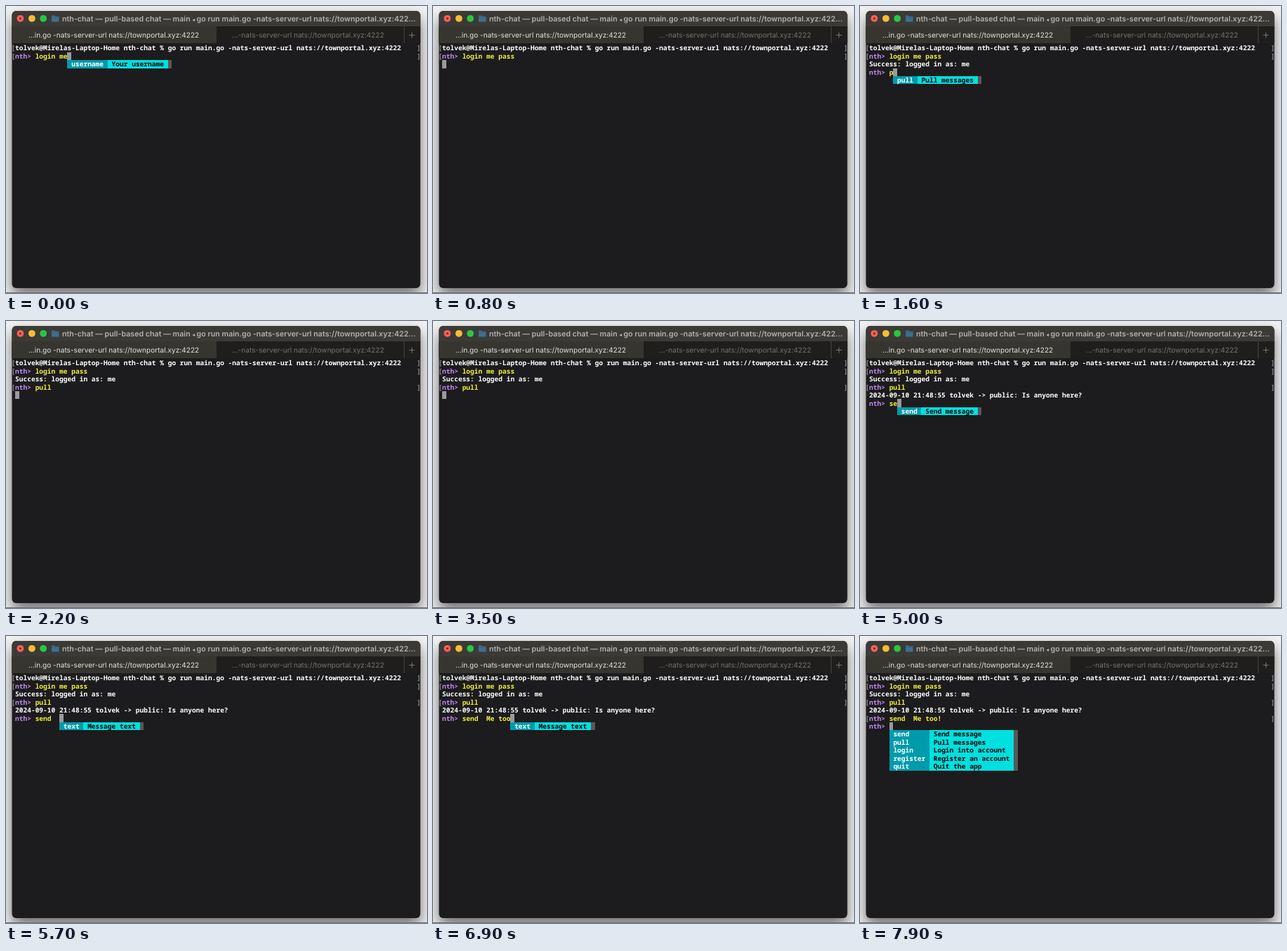
Recreate the animation shown at these times as an HTML page. Size 600 by 409 pixels, loop 8000 ms.

```html
<!DOCTYPE html>
<html lang="en">
<head>
<meta charset="utf-8">
<title>nth-chat terminal</title>
<style>
  html, body { margin: 0; width: 100%; height: 100%; overflow: hidden; background: #f2f2f2; }
  svg { display: block; width: 600px; height: 409px; }
  text { white-space: pre; text-rendering: geometricPrecision; }
  .bar { font: 10.1px Inter, Roboto, sans-serif; }
  .title { font: 600 10.7px Inter, Roboto, sans-serif; }
  #screen { font: 600 9.55px "Noto Sans Mono", "DejaVu Sans Mono", monospace; }
  #screen rect { shape-rendering: crispEdges; }
  .window { filter: drop-shadow(0 10px 10px rgba(0, 0, 0, .55)); }
</style>
</head>
<body>
<svg viewBox="0 0 600 409">
  <defs><clipPath id="frame"><rect x="8.500" y="7" width="582" height="395" rx="6"/></clipPath></defs>
  <rect class="window" x="8.500" y="7" width="582" height="395" rx="6" fill="#1c1b1d"/>
  <rect y="408" width="600" height="1" fill="#6b6b6b"/>
  <g clip-path="url(#frame)">
    <rect x="8" y="7" width="583" height="22" fill="#3b3a37"/>
    <rect x="8" y="29" width="583" height="24" fill="#1f1e1d"/>
    <rect x="8" y="29" width="292" height="24" fill="#363530"/>
    <path d="M567.5 29V53" stroke="#454441"/>
  </g>
  <circle cx="20.400" cy="17.800" r="4.900" fill="#fe5f57"/>
  <circle cx="20.400" cy="17.800" r="1.500" fill="#8c1a10"/>
  <circle cx="36.900" cy="17.800" r="4.900" fill="#febc2e"/>
  <circle cx="53.200" cy="17.800" r="4.900" fill="#28c840"/>
  <path d="M65 13.500h4l1.200 1.200h5.300v7.800H65z" fill="#3d6f92"/>
  <path d="M65 16h10.500" stroke="#315b79" stroke-width=".7"/>
  <text class="title" x="80" y="21.500" fill="#b3b2af">nth-chat — pull-based chat — main <tspan font-size="7">◂</tspan> go run main.go -nats-server-url nats://townportal.xyz:422…</text>
  <text class="bar" x="32" y="44.700" fill="#e4e3e1">…in.go -nats-server-url nats://townportal.xyz:4222</text>
  <text class="bar" x="322" y="44.700" fill="#757472">…-nats-server-url nats://townportal.xyz:4222</text>
  <path d="M574.500 41.500h8M578.500 37.500v8" stroke="#777673"/>
  <g id="screen"></g>
</svg>
<script>
const LOOP = 8000, LEFT = 13, TOP = 54.2, CELL = 5.73, ROW = 11.45;
const COLOR = {
  text: '#fff', prompt: '#c08af0', input: '#f0f03a', mark: '#858488',
  cursor: '#9a999c', name: '#009bab', about: '#00e0e0', thumb: '#58585a'
};

const COMMANDS = [
  ['send', 'Send message'], ['pull', 'Pull messages'], ['login', 'Login into account'],
  ['register', 'Register an account'], ['quit', 'Quit the app']
];
const OUTPUT = [
  { at: 0, row: 0, text: 'tolvek@Mirelas-Laptop-Home nth-chat % go run main.go -nats-server-url nats://townportal.xyz:4222' },
  { at: 1000, row: 2, text: 'Success: logged in as: me' },
  { at: 3700, row: 4, text: '2024-09-10 21:48:55 tolvek -> public: Is anyone here?' }
];
// keys: the time of each typed character after the preset part
const PROMPTS = [
  { at: 0, row: 1, preset: 8, text: 'login me pass', keys: [100, 300, 400, 500, 700], enter: 800, marked: true },
  { at: 1000, row: 3, text: 'pull', keys: [1500, 1700, 1900, 2000], enter: 2200 },
  { at: 3700, row: 5, text: 'send  Me too!', enter: 7500,
    keys: [4600, 4800, 5100, 5200, 5400, 5600, 5900, 6000, 6200, 6400, 6500, 6600, 7100] },
  { at: 7700, row: 6, text: '', keys: [], enter: LOOP }
];

const screen = document.getElementById('screen');
const x = col => LEFT + col * CELL;
const y = row => TOP + row * ROW;

const write = (col, row, text, color) =>
  `<text x="${x(col)}" y="${y(row) + 9.1}" fill="${color}">${text.replace(/>/g, '&gt;')}</text>`;
const fill = (col, row, cols, rows, color) =>
  `<rect x="${x(col)}" y="${y(row)}" width="${cols * CELL}" height="${rows * ROW}" fill="${color}"/>`;
const marks = row => write(-0.95, row, '[', COLOR.mark) + write(99.9, row, ']', COLOR.mark);

function suggest(input) {
  if (input.startsWith('login me ')) return [['password', 'Your password']];
  if (input.startsWith('login ')) return [['username', 'Your username']];
  if (input.startsWith('send ')) return [['text', 'Message text']];
  return COMMANDS.filter(([name]) => name.startsWith(input));
}

function menu(col, row, items) {
  const width = i => Math.max(...items.map(item => item[i].length)) + 2;
  const a = width(0), b = width(1), n = items.length;
  return fill(col, row, a, n, COLOR.name) + fill(col + a, row, b, n, COLOR.about) +
    fill(col + a + b, row, 1, n, COLOR.thumb) +
    items.map(([name, about], i) =>
      write(col + 1, row + i, name, '#fff') + write(col + a + 1, row + i, about, '#000')).join('');
}

function prompt(p, t) {
  const sent = t >= p.enter;
  const typed = p.text.slice(0, (p.preset || 0) + p.keys.filter(k => k <= t).length);
  const col = 5 + typed.length;
  let out = write(0, p.row, 'nth>', COLOR.prompt) + write(5, p.row, typed, COLOR.input);
  if (sent || p.marked) out += marks(p.row);
  if (!sent) out += fill(col, p.row, 1, 1, COLOR.cursor) + menu(col, p.row + 1, suggest(typed));
  return out;
}

function render(t) {
  const lines = OUTPUT.filter(line => line.at <= t);
  const shown = PROMPTS.filter(p => p.at <= t);
  const last = shown[shown.length - 1];
  let out = marks(0) + lines.map(line => write(0, line.row, line.text, COLOR.text)).join('');
  out += shown.map(p => prompt(p, t)).join('');
  if (t >= last.enter) out += fill(0, last.row + 1, 1, 1, COLOR.cursor);
  return out;
}

let current = '';
function tick() {
  const next = render(performance.now() % LOOP);
  if (next !== current) screen.innerHTML = current = next;
  requestAnimationFrame(tick);
}
tick();
</script>
</body>
</html>
```
